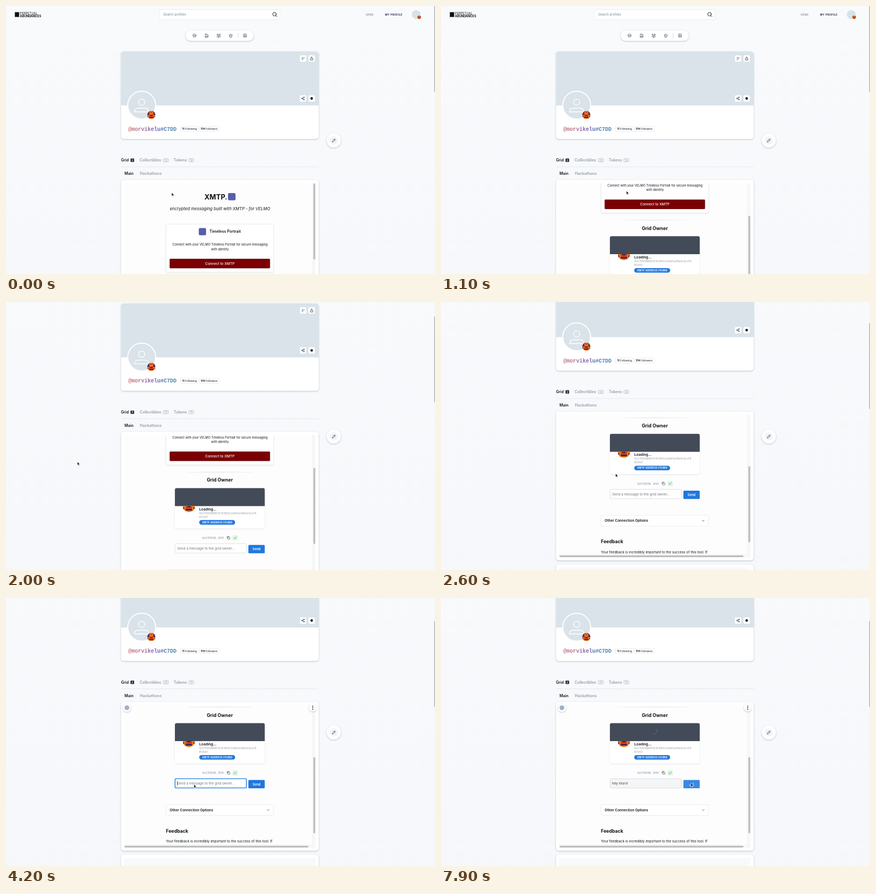
Animation of 800x500 px, one loop 8000 ms. Source, as an HTML page:

```html
<!DOCTYPE html>
<html lang="en">
<head>
<meta charset="utf-8">
<title>Profile grid</title>
<style>
html, body { margin: 0; width: 100%; height: 100%; overflow: hidden; background: #f8f9fb; }
svg { display: block; width: 800px; height: 500px; }
text { font-family: Inter, "Open Sans", sans-serif; fill: #111418; white-space: pre; }
.mid { text-anchor: middle; }
.semi { font-weight: 600; }
.bold { font-weight: 700; }
.tab { font-size: 7.05px; font-weight: 600; }
.body { font-size: 6.35px; }
.dim { fill: #959ca5; }
.white { fill: #fff; }
.card { fill: #fff; filter: drop-shadow(0 1px 1.5px rgba(40, 55, 80, .28)); }
.soft { fill: #fff; filter: drop-shadow(0 1px 1.5px rgba(40, 55, 80, .12)); }
.line { fill: none; stroke: #3c4854; stroke-width: .8; stroke-linecap: round; stroke-linejoin: round; }
.dot { fill: #3c4854; }
.edge { stroke: #e2e5ea; stroke-width: .7; }
</style>
</head>
<body>
<svg viewBox="0 0 800 500">
  <defs>
    <linearGradient id="sky" x2="0" y2="1"><stop stop-color="#f9fafc"/><stop offset="1" stop-color="#f1f4f9"/></linearGradient>
    <linearGradient id="nick" gradientUnits="userSpaceOnUse" x1="228" x2="318">
      <stop stop-color="#cf7478"/><stop offset=".3" stop-color="#a8739a"/><stop offset=".6" stop-color="#6a5cb4"/>
      <stop offset=".68" stop-color="#4f7fb0"/><stop offset="1" stop-color="#5189b2"/>
    </linearGradient>
    <linearGradient id="rule"><stop stop-color="#d5d9df" stop-opacity=".4"/><stop offset=".5" stop-color="#d5d9df"/><stop offset="1" stop-color="#d5d9df" stop-opacity=".4"/></linearGradient>
    <clipPath id="view"><rect x="220" y="330.5" width="351.5" height="260.5"/></clipPath>
    <clipPath id="below"><rect x="315" y="573.5" width="168" height="30"/></clipPath>
  </defs>

  <g id="page">
    <rect width="800" height="1560" fill="url(#sky)"/>

    <!-- header -->
    <rect x="16.5" y="11.5" width="8" height="9" fill="#111"/>
    <text x="26" y="15.6" font-size="5.7">PERPETUAL</text>
    <text x="26" y="21" font-size="5.6" class="bold">ABUNDANCES</text>
    <rect x="286" y="6.5" width="225" height="19" rx="3" fill="#fff" class="edge"/>
    <text x="293" y="18.4" font-size="6" fill="#75879a" style="fill:#75879a">Search profiles</text>
    <g class="line" style="stroke:#222;stroke-width:1"><circle cx="500.7" cy="15.3" r="3.3"/><path d="M503.2 17.8l2.2 2.2"/></g>
    <text x="678" y="17.7" font-size="5" letter-spacing=".25" class="mid semi" style="fill:#8d8aa8">SEND</text>
    <text x="723" y="17.7" font-size="5" letter-spacing=".25" class="mid bold" style="fill:#3d3163">MY PROFILE</text>
    <circle cx="765" cy="16" r="8.2" fill="#d8e2e8"/>
    <g data-ident="770.5 21 3.3"></g>

    <!-- toolbar -->
    <rect x="335" y="45.5" width="127" height="19.5" rx="9.7" class="card"/>
    <g class="line">
      <circle cx="351.5" cy="55.2" r="2.9"/><path d="M350 55.2h3"/>
      <path d="M371.3 54v-1.7h3.4M371.3 56.5v1.7h2"/><circle cx="374.8" cy="55.8" r="2"/><path d="M376.5 52.5v0M373 58l4 0"/>
      <circle cx="394.6" cy="53.3" r="1"/><circle cx="398.6" cy="53.3" r="1"/><circle cx="396.6" cy="56" r="1"/><path d="M393.3 57.5l1-2M400 57.5l-1-2M395 58.6h3.2"/>
      <path d="M416.4 55.4a2.8 2.8 0 1 1 5.6 0l-1.3 1.2v1.6h-3v-1.6z"/><path d="M418 55.2h.5M420 55.2h.5"/>
      <rect x="443" y="52.4" width="5.4" height="5.6" rx="1"/><path d="M444.5 56.3v-1M445.8 56.3v-2M447 56.3v-.6"/>
      <path d="M432.5 50.5v9.5" style="stroke:#d3d9df"/>
    </g>

    <!-- profile card -->
    <rect x="214.5" y="85" width="368.5" height="163" rx="5" class="card"/>
    <path d="M214.5 185.5V90a5 5 0 0 1 5-5H578a5 5 0 0 1 5 5V185.5z" fill="#d9e3e9"/>
    <g fill="#fff">
      <rect x="548" y="92" width="12" height="12" rx="2.5"/><rect x="564" y="92" width="12" height="12" rx="2.5"/>
      <rect x="548" y="166.5" width="12" height="12" rx="2.5"/><rect x="564" y="166.5" width="12" height="12" rx="2.5"/>
    </g>
    <g class="line">
      <path d="M552 96.3h1.4M555 96.3h1.4M552 98.3h1.4M552 100.2h1.4M555 98.3h.5"/>
      <path d="M568.3 97.8h-.7v3.2h4.8v-3.2h-.7M570 99v-4M568.6 96.2l1.4-1.4 1.4 1.4"/>
      <circle cx="552.2" cy="172.5" r="1.1"/><circle cx="555.6" cy="170.4" r="1"/><circle cx="555.6" cy="174.6" r="1"/><path d="M553.2 172l1.6-1M553.2 173l1.6 1"/>
    </g>
    <circle cx="570" cy="172.5" r="2.4" fill="#222"/>
    <circle cx="253" cy="185" r="26" fill="#d9e3e9" stroke="#fff" stroke-width="2"/>
    <g fill="none" stroke="#fff" stroke-width="1.3">
      <circle cx="253" cy="179.5" r="5.8"/>
      <path d="M239.5 197.5c0-5 3.5-7 8-7h11c4.500 0 8 2 8 7z"/>
    </g>
    <g data-ident="271 203.2 7.7"></g>
    <text x="228" y="232.6" font-size="10" style="font-family:'Liberation Mono','DejaVu Sans Mono',monospace;font-weight:700;fill:url(#nick)">@morvikelu#C7DD</text>
    <rect x="325" y="224.500" width="34" height="9.500" rx="2" fill="#fff" class="edge"/>
    <rect x="360.500" y="224.500" width="37" height="9.500" rx="2" fill="#fff" class="edge"/>
    <text x="342.2" y="231.2" font-size="4.9" class="mid"><tspan class="bold">11</tspan> Following</text>
    <text x="378.7" y="231.2" font-size="4.9" class="mid"><tspan class="bold">174</tspan> Followers</text>

    <!-- tabs -->
    <text x="214.500" y="290.2" class="tab bold">Grid</text>
    <rect x="232.2" y="284.6" width="6.800" height="6.400" rx="1.3" fill="#243040"/>
    <text x="235.6" y="289.5" font-size="4.600" class="mid semi white">2</text>
    <text x="249.2" y="290.2" class="tab dim">Collectibles</text>
    <text x="312.800" y="290.2" class="tab dim">Tokens</text>
    <g fill="none" stroke="#a7adb5" stroke-width=".7">
      <rect x="293.3" y="284.800" width="9.400" height="6" rx="1.2"/><rect x="341" y="284.800" width="9" height="6" rx="1.2"/>
    </g>
    <text x="298" y="289.500" font-size="4.500" class="mid dim">20</text>
    <text x="345.500" y="289.500" font-size="4.500" class="mid dim">14</text>
    <path d="M214.500 300H583" stroke="#dfe7ed" stroke-width=".9"/>
    <text x="221" y="315" class="tab">Main</text>
    <text x="249.500" y="315" class="tab dim">Hackathons</text>

    <!-- grid cell -->
    <rect x="214.500" y="324.500" width="368.500" height="277.500" rx="5" class="card"/>
    <rect x="220" y="330.500" width="357.500" height="266" fill="#fdfdfd"/>
    <g clip-path="url(#view)">
      <g id="inner">
        <text x="370" y="361" font-size="13" class="bold">XMTP.</text>
        <rect x="414" y="349" width="14" height="13.500" rx="2.500" fill="#5560a8"/>
        <text x="399" y="381.200" font-size="7.750" class="mid" font-style="italic">encrypted messaging built with XMTP - for VELMO</text>

        <rect x="298.500" y="407" width="200.500" height="89.500" rx="3" class="soft"/>
        <rect x="298.500" y="407" width="200.500" height="89.500" rx="3" fill="#fff" class="edge"/>
        <rect x="359.500" y="414.200" width="13.600" height="13.600" rx="2.500" fill="#5560a8"/>
        <text x="379.500" y="423.400" font-size="7.100" class="semi">Timeless Portrait</text>
        <text x="399" y="447.400" font-size="5.700" class="mid">Connect with your VELMO Timeless Portrait for secure messaging</text>
        <text x="399" y="455.700" font-size="5.700" class="mid">with identity</text>
        <rect x="305.500" y="472" width="186.500" height="17" rx="1" fill="#7b0003" stroke="#520000" stroke-width=".7"/>
        <text x="398.800" y="482.800" font-size="6.500" font-weight="500" class="mid white">Connect to XMTP</text>

        <rect x="338" y="509.700" width="121" height=".8" fill="url(#rule)"/>
        <text x="398.700" y="528" font-size="8.750" class="mid bold">Grid Owner</text>

        <rect x="315" y="540" width="167.500" height="75" rx="3" class="soft"/>
        <path d="M315 573.500V543a3 3 0 0 1 3-3H479.500a3 3 0 0 1 3 3V573.500z" fill="#434a58"/>
        <circle id="load" cx="398.700" cy="555.700" r="4.700" fill="none" stroke="#2f74cf" stroke-width="1" stroke-dasharray="9 2.500 6 12"/>
        <g clip-path="url(#below)"><g data-ident="341 573 11.600"></g></g>
        <text x="360.300" y="581.200" font-size="6.700" class="semi">Loading...</text>
        <text x="360.300" y="588.400" font-size="4.850" class="dim">0xC7DD5BB857b1439F8c2dA65e4Be8c5ecF8</text>
        <text x="360.300" y="595.300" font-size="4.850" class="dim">B13F61</text>
        <rect x="360.300" y="599.500" width="67" height="8.600" rx="4.300" fill="#2479dc"/>
        <text x="394" y="605.400" font-size="4.400" letter-spacing=".25" class="mid bold white">XMTP ADDRESS FOUND</text>

        <text x="366" y="634.600" font-size="4.900" style="fill:#7c838c">0xC7DD5B...3F61</text>
        <g class="line" style="stroke:#555c66"><rect x="413.800" y="631.500" width="3.700" height="3.900" rx=".8"/><path d="M412.300 633.700v-3.600h3.600"/></g>
        <rect x="422.500" y="628" width="9.500" height="9.500" rx="1.500" fill="#dcf5e0"/>
        <path d="M425 633l1.600 1.700 3-3.700" class="line" style="stroke:#3f9a57"/>

        <rect id="field" x="315.300" y="643.600" width="133" height="17.300" rx="1.500"/>
        <text id="typed" x="319" y="654.700" class="body"></text>
        <rect id="caret" y="648.300" width=".7" height="8" fill="#111"/>
        <rect id="send" x="452" y="646" width="30.500" height="15.400" rx="1.500"/>
        <text id="label" x="467.200" y="656" font-size="6" class="mid semi white">Send</text>
        <circle id="wait" cx="467.200" cy="654" r="3.700" fill="none" stroke="#d5e6fa" stroke-width="1" stroke-dasharray="14 9.250"/>

        <rect x="298.500" y="692" width="200.500" height="20" rx="2.500" fill="#fff" class="edge"/>
        <text x="305.300" y="704.400" font-size="6.450" class="semi">Other Connection Options</text>
        <path d="M487.200 701.300l1.800 1.800 1.800-1.800" class="line"/>
        <text x="298.300" y="744" font-size="8.700" class="bold">Feedback</text>
        <text x="298.300" y="762.800" class="body">Your feedback is incredibly important to the success of this tool. If</text>
      </g>
    </g>
    <path d="M571.800 330.500V591M220 591.300H577.500" stroke="#e9eaec" stroke-width=".7"/>
    <rect x="572.200" y="330.500" width="5.300" height="266" fill="#f7f7f8"/>
    <rect x="220" y="591.700" width="357.500" height="5" fill="#f7f7f8"/>
    <rect id="thumb" x="573.200" width="3.400" height="142" rx="1.700" fill="#bcbdbf"/>
    <rect x="221" y="592.700" width="343" height="3.300" rx="1.650" fill="#bcbdbf"/>
    <g id="tools">
      <circle cx="225.500" cy="335.200" r="7.700" class="card"/><circle cx="225.500" cy="335.200" r="4.500" fill="#a4b1c7"/>
      <circle cx="572" cy="335.200" r="7" class="card"/>
      <g fill="#111"><circle cx="572" cy="332.200" r=".9"/><circle cx="572" cy="335.200" r=".9"/><circle cx="572" cy="338.200" r=".9"/></g>
    </g>
    <rect x="214.500" y="609.500" width="368.500" height="278" rx="5" class="card"/>
    <rect x="220" y="615.500" width="357.500" height="266" fill="#f8f9fa"/>
  </g>

  <rect x="798" width="2" height="500" fill="#f6f7f8"/>
  <rect id="bar" x="798.500" width="1.500" height="160" rx=".7" fill="#b3b6bb"/>
  <circle cx="611.300" cy="250.800" r="13.300" class="card"/>
  <circle cx="611.300" cy="250.800" r="7.500" fill="#f0f4f7"/>
  <path d="M608.600 253.600l.5-2 3.700-3.700 1.500 1.500-3.700 3.700zM611.900 248.800l1.500 1.500" class="line"/>
  <path id="mouse" d="M0 0V6.600L1.500 5.300 2.500 7.700 3.600 7.200 2.600 4.900 4.600 4.800z" fill="#111" stroke="#fff" stroke-width=".6"/>
</svg>

<script>
const LOOP = 8000;
const NS = 'http://www.w3.org/2000/svg';
const $ = id => document.getElementById(id);

// rows of the left half, mirrored to the right: 0 base, 1 red, 2 dark
const BLOCKS = ['0010', '0201', '1200', '2210', '0012', '2011', '1022', '0100'];
const INKS = ['#f4780f', '#cf3c1c', '#33205a'];

function make(tag, attrs, parent) {
  const el = document.createElementNS(NS, tag);
  for (const k in attrs) el.setAttribute(k, attrs[k]);
  return parent.appendChild(el);
}

document.querySelectorAll('[data-ident]').forEach((g, n) => {
  const [cx, cy, r] = g.dataset.ident.split(' ').map(Number);
  const clip = make('clipPath', { id: 'disc' + n }, g);
  make('circle', { cx, cy, r }, clip);
  const art = make('g', { 'clip-path': `url(#disc${n})` }, g);
  make('circle', { cx, cy, r, fill: INKS[0] }, art);
  const u = r / 4;
  BLOCKS.forEach((row, j) => [...row].forEach((c, i) => {
    if (c === '0') return;
    for (const col of [i, 7 - i])
      make('rect', { x: cx - r + col * u, y: cy - r + j * u, width: u, height: u, fill: INKS[c] }, art);
  }));
});

// tables of [time, value...]
const PAGE = [[1500, 0], [1650, 14], [2000, 82], [2200, 114], [2320, 120], [2620, 120], [2900, 130.5]];
const INNER = [[550, 0], [700, 42], [850, 88], [1000, 108], [1100, 110.5], [2350, 110.5], [2480, 150], [2600, 174], [2680, 176]];
const MOUSE = [[0, 309, 348], [500, 312, 348], [800, 340, 346], [1100, 346, 345], [1200, 320, 338], [1400, 130, 304],
  [1550, 105, 296], [2000, 133, 298], [2300, 178, 301], [2450, 270, 313], [2600, 325.500, 320], [3300, 333, 328],
  [3900, 350, 346], [4100, 350.500, 347.500], [6600, 350.500, 347.500], [6900, 405, 350], [7250, 462, 347], [7450, 466, 345.500]];
const TOOLS = [[3200, 0], [3400, 1]];
const KEYS = [4800, 5100, 5300, 5450, 5600, 5720, 5840, 5960, 6120];
const WORDS = 'hey morvi';
const FOCUS = 4100, SENT = 7500;

function at(track, t, k = 1) {
  const i = track.findIndex(p => p[0] > t);
  if (i < 0) return track[track.length - 1][k];
  if (i === 0) return track[0][k];
  const a = track[i - 1], b = track[i];
  return a[k] + (b[k] - a[k]) * (t - a[0]) / (b[0] - a[0]);
}
const move = (id, x, y) => $(id).setAttribute('transform', `translate(${x} ${y})`);
const spin = (id, t, period) => {
  const el = $(id);
  el.setAttribute('transform', `rotate(${t / period * 360 % 360} ${el.getAttribute('cx')} ${el.getAttribute('cy')})`);
};
const show = (id, on) => { $(id).style.opacity = +on; };

function render(t) {
  const y = at(PAGE, t), inner = at(INNER, t);
  move('page', 0, -y);
  move('inner', 0, -inner);
  move('bar', 0, y * .33);
  $('thumb').setAttribute('y', 331 + inner * .548);
  move('mouse', at(MOUSE, t), at(MOUSE, t, 2));
  show('mouse', t < KEYS[0] || t >= 6550);
  show('tools', at(TOOLS, t));

  const count = KEYS.filter(k => k <= t).length;
  const focus = t >= FOCUS && t < SENT, sent = t >= SENT;
  const typed = $('typed'), field = $('field');
  typed.textContent = count ? WORDS.slice(0, count) : 'Send a message to the grid owner...';
  typed.style.fill = sent ? '#3d4248' : count ? '#111418' : '#6f7782';
  field.setAttribute('fill', sent ? '#f4f5f6' : '#fff');
  field.setAttribute('stroke', focus ? '#1f78de' : '#d3d8df');
  field.setAttribute('stroke-width', focus ? 1.4 : .8);
  $('caret').setAttribute('x', 319 + (count ? typed.getComputedTextLength() : 0));
  show('caret', focus && (t < 4500 || (t >= 4800 && t < 6620) || t >= 7120));

  $('send').setAttribute('fill', sent ? '#3a89e2' : '#1f78de');
  show('label', !sent);
  show('wait', sent);
  show('load', t >= KEYS[0]);
  spin('wait', t, 800);
  spin('load', t, 900);
}

const start = performance.now();
(function tick() {
  render((performance.now() - start) % LOOP);
  requestAnimationFrame(tick);
})();
</script>
</body>
</html>
```
